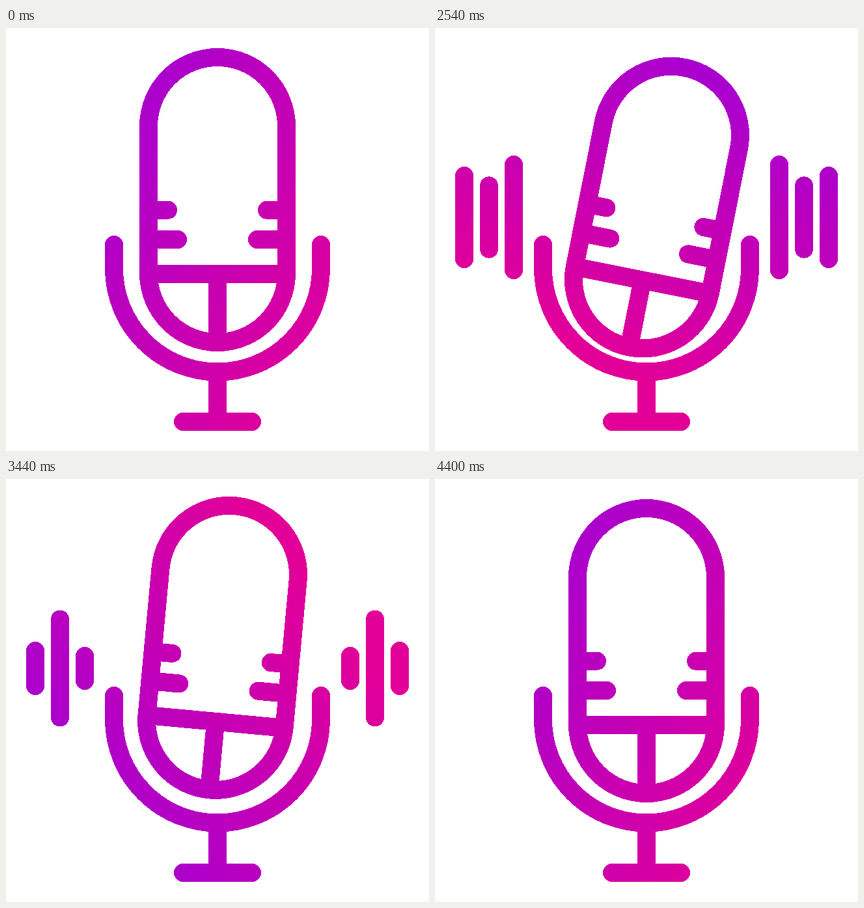
Recreate the animation shown at these times as an HTML page. Size 650 by 650 pixels, loop 4.43 s.

```html
<!DOCTYPE html>
<html lang="en">
<head>
<meta charset="utf-8">
<title>Microphone</title>
<style>
html, body { margin: 0; width: 100%; height: 100%; overflow: hidden; background: #fff; }
svg { display: block; width: 100vw; height: 100vh; }
</style>
</head>
<body>
<svg viewBox="0 0 650 650">
  <defs>
    <linearGradient id="tint" gradientUnits="userSpaceOnUse">
      <stop offset="0" stop-color="#a600d2"/>
      <stop offset="1" stop-color="#e20098"/>
    </linearGradient>
    <mask id="icon" maskUnits="userSpaceOnUse" x="0" y="0" width="650" height="650">
      <g fill="none" stroke="#fff" stroke-width="28" stroke-linecap="round" shape-rendering="crispEdges">
        <path d="M166 333V369.5A159 159 0 0 0 484 369.5V333M325 528.5V605M272 605H378"/>
        <g id="mic">
          <rect x="219" y="45" width="212" height="438" rx="106"/>
          <path d="M219 279.7H249M219 325H264M431 279.7H401M431 325H386M219 378H431M325 378V483"/>
        </g>
        <path id="bars"/>
      </g>
    </mask>
  </defs>
  <rect width="650" height="650" fill="url(#tint)" mask="url(#icon)"/>
</svg>
<script>
const LOOP = 4430, REST = 2000, MOVE = 2400, STEP = 30;
const CENTER = 325, PIVOT_Y = 346, BAR_Y = 291, REACH = 245;

// Smooth swing that starts and ends at zero, through evenly spaced values.
function swing(...values) {
  const p = [-values[0], 0, ...values, 0, -values.at(-1)];
  const count = values.length + 1;
  return progress => {
    const i = Math.min(count - 1, Math.floor(progress * count));
    const u = progress * count - i;
    const [a, b, c, d] = p.slice(i, i + 4);
    return b + u / 2 * (c - a + u * (2 * a - 5 * b + 4 * c - d + u * (3 * (b - c) + d - a)));
  };
}

const drop = swing(27, 16, -4, 42.5, 10, -5, -10, 15.5, 6);
const tilt = swing(-2.5, 11, 6, -6.7, 0, 5.3, 2, -1.4, -1);
const turn = u => 2 * Math.PI * (1 - (1 - u ** 1.6) ** 2.9);

// Half lengths of the bars from the outside in; each bar has a mirrored twin.
const bars = [
  swing(65.5, 12, 27, 13.5),
  swing(83, 47, 70, 91.5, 75, 75.5, 60, 49.5, 30),
  swing(83.5, 8, 19, 54)
];

const $ = id => document.getElementById(id);
const mic = $("mic"), barPath = $("bars"), tint = $("tint");

function drawBars(u) {
  const d = bars.map((half, i) => {
    const x = 45 + 38 * i, h = half(u);
    return [x, 650 - x].map(c => `M${c} ${BAR_Y - h}V${BAR_Y + h}`).join("");
  });
  barPath.setAttribute("d", u > 0 && u < 1 ? d.join("") : "");
}

// The colours turn once around a point beside the centre.
function drawTint(u) {
  const angle = turn(u), heading = angle + Math.PI / 6;
  const shift = 55 * (1 - Math.cos(angle));
  [-REACH, REACH].forEach((reach, i) => {
    tint.setAttribute("x" + (i + 1), CENTER + (reach - shift) * Math.cos(heading));
    tint.setAttribute("y" + (i + 1), CENTER + (reach - shift) * Math.sin(heading));
  });
}

function draw(time) {
  const t = Math.floor((time % LOOP - REST) / STEP) * STEP;
  const u = Math.max(0, Math.min(1, t / MOVE));
  mic.setAttribute("transform",
    `translate(0 ${drop(u)}) rotate(${tilt(u)} ${CENTER} ${PIVOT_Y})`);
  drawBars(u);
  drawTint(u);
}

const start = performance.now();
function tick() {
  draw(performance.now() - start);
  requestAnimationFrame(tick);
}
tick();
</script>
</body>
</html>
```
